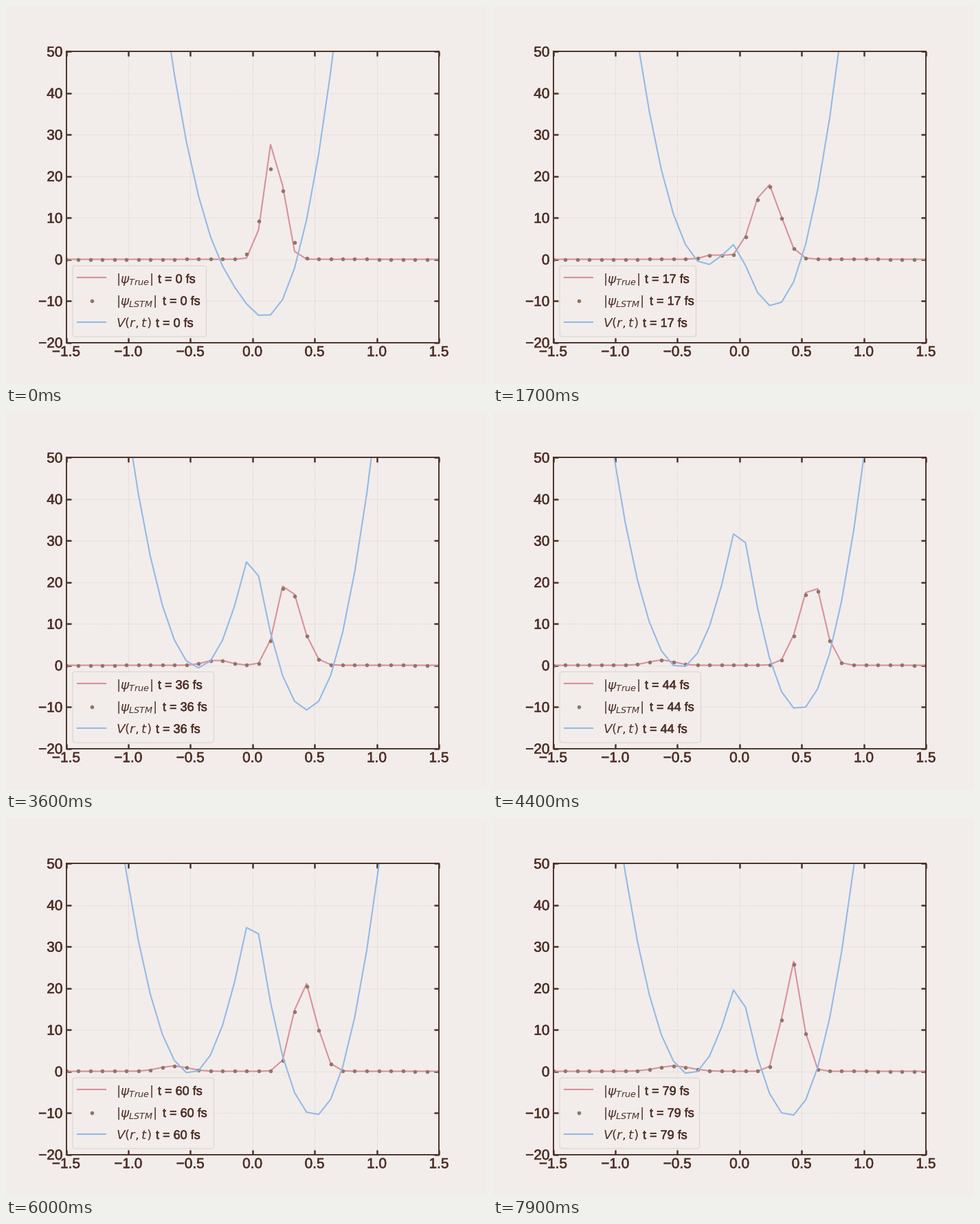
Animation, 700 px wide and 550 px high, one loop 8 s. Source, as a matplotlib script:

```python
import numpy as np
import matplotlib.pyplot as plt
from matplotlib.animation import FuncAnimation
from matplotlib.patches import FancyBboxPatch
from matplotlib.patheffects import withStroke

PAPER, INK, GRID = "#f2edea", "#4f3028", "#d3ccc9"
PINK, BROWN, BLUE = "#da909c", "#907666", "#94b9e8"
FRAMES = 80
TOTAL = 54.6  # sum of the density over the grid

plt.rcParams.update({
    "font.family": "Liberation Sans",
    "mathtext.fontset": "dejavusans",
    "text.color": INK,
    "lines.linewidth": 1.5,
})

x = np.linspace(-1.5, 1.5, 32)


def ease(t, start, end):
    p = np.clip((t - start) / (end - start), 0, 1)
    return p * p * (3 - 2 * p)


def half_gap(t):
    """Half the distance between the two wells."""
    return .2605 + .241 * np.cos(.0396 * (t - 55))


def potential(t):
    """Lower state of two coupled harmonic wells."""
    r = half_gap(t)
    a = 179.5 * (x + r) ** 2 - .45
    b = 222.5 * (x - r) ** 2 - 10.55
    coupling = 10 - 10.5 * r
    return (a + b) / 2 - np.hypot((a - b) / 2, coupling)


def bump(center, left, right):
    d = x - center
    return np.exp(-.5 * (d / np.where(d < 0, left, right)) ** 2)


def packet_center(t):
    """Shallow swing at first, then a damped swing about the right well."""
    early = .125 + .0029 * t + .045 * np.cos(.38 * t)
    swing = .168 - .125 * ((t - 28) / 51) ** 2
    late = half_gap(t) + swing * np.cos(.493 * (t - 29.7))
    return early + (late - early) * ease(t, 17, 28)


def density(t, widen=1.0):
    r = half_gap(t)
    center = packet_center(t)
    skew = (center - r) * ease(t, 17, 28)
    width = .072 + .026 * np.sin(np.pi * t / FRAMES)
    width = widen * (width + .022 * np.exp(-((t - 17) / 5) ** 2))
    main = bump(center, width * (1 + skew), width * (1 - skew))

    # Small part that crosses into the left well
    spread = .06 + .0009 * t
    offset = -.15 * np.cos(.38 * (t - 28))
    side = 1.3 * ease(t, 9, 19) * bump(offset - r, spread, spread)
    return main * (TOTAL - side.sum()) / main.sum() + side


def predicted(t):
    return .97 * density(t, 1 + .26 * np.exp(-t / 3))


fig = plt.figure(figsize=(7, 5.5), dpi=100, facecolor=PAPER)
ax = fig.add_axes([.125, .11, .775, .77], facecolor=PAPER)
ax.set(xlim=(-1.5, 1.5), ylim=(-20, 50))
ax.set_xticks(np.arange(-1.5, 1.6, .5))
ax.set_yticks(range(-20, 51, 10))
ax.grid(color=GRID, linestyle=":", linewidth=.7)
ax.set_axisbelow(True)
ax.tick_params(direction="in", top=True, right=True, length=5, width=1.8,
               color=INK, labelcolor=INK, labelsize=15, pad=3.5)
ax.spines[:].set(color=INK, linewidth=1.4)

# A thin outline gives the text a medium weight
medium = [withStroke(linewidth=.4, foreground=INK)]
for label in ax.get_xticklabels() + ax.get_yticklabels():
    label.set_path_effects(medium)

true_line, = ax.plot(x, density(0), color=PINK)
dots, = ax.plot(x, predicted(0), ".", color=BROWN)
well_line, = ax.plot(x, potential(0), color=BLUE)

# Legend, laid out in pixels
panel = fig.add_axes([0, 0, 1, 1])
panel.set(xlim=(0, 700), ylim=(550, 0))
panel.axis("off")
frame = FancyBboxPatch((101, 382), 186, 95, boxstyle="round,pad=4,rounding_size=4",
                       facecolor=PAPER, edgecolor="#d8d0cd", lw=.8, alpha=.85)
panel.add_patch(frame)
panel.plot([104, 145], [395, 395], color=PINK)
panel.plot([124.5], [428.5], ".", color=BROWN)
panel.plot([104, 145], [460, 460], color=BLUE)

times = []
for label, left, base in [(r"$|\psi_{True}|$", 221, 403),
                          (r"$|\psi_{LSTM}|$", 228, 435),
                          (r"$V(r,t)$", 218, 467)]:
    panel.text(160, base, label, fontsize=13.3, va="baseline")
    times.append(panel.text(left, base, "", fontsize=13, va="baseline",
                            path_effects=medium))


def update(t):
    true_line.set_ydata(density(t))
    dots.set_ydata(predicted(t))
    well_line.set_ydata(potential(t))
    digits = str(t)
    for text in times:
        text.set_text(f"t = {digits} fs")
    # Ones and sevens are narrower than the other digits
    frame.set_width(175.5 + 11 * len(digits)
                    - 5 * digits.count("1") - 2 * digits.count("7"))
    return [true_line, dots, well_line, frame, *times]


anim = FuncAnimation(fig, update, frames=FRAMES, interval=100,
                     repeat=True, repeat_delay=0, blit=False)
plt.show()
```
